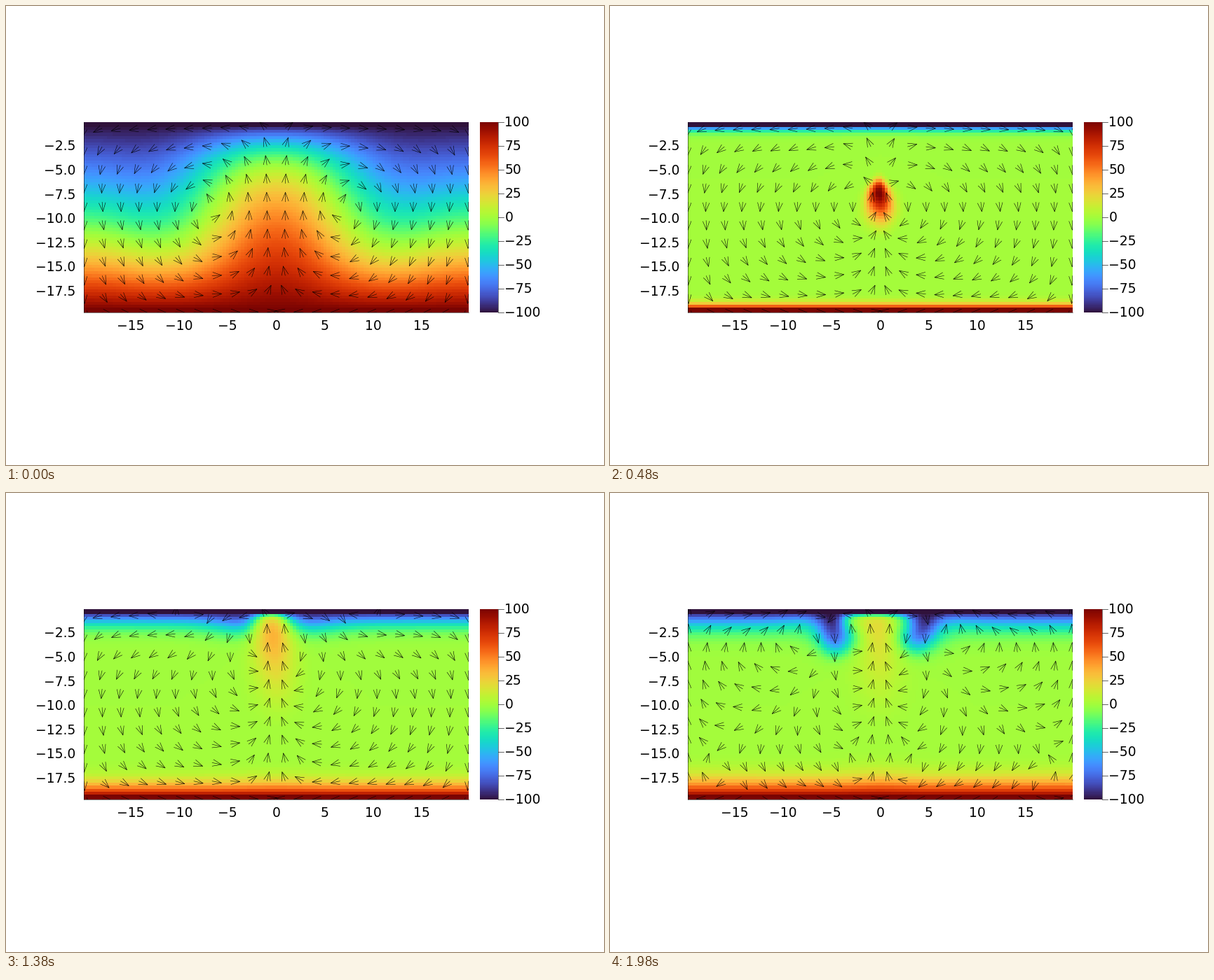
A matplotlib script for the animation above (2 s loop, 853 by 656 pixels).

```python
import numpy as np
import matplotlib.pyplot as plt
from matplotlib.animation import FuncAnimation
from matplotlib.collections import LineCollection

W, H, DPI = 853, 656, 128
PX = 72 / DPI                                  # points per pixel
LEFT, TOP, RIGHT, BOTTOM = 111, 166, 659.5, 438
FONT = 18.8

# Porous convection in a 40 x 20 box
LX, LY, DT, PHI = 40.0, 20.0, 200.0, 0.1
NY = 63
NX = 2 * (NY + 1) - 1
DX, DY = LX / NX, LY / NY
xc = -LX / 2 + DX * (np.arange(NX) + 0.5)
yc = -LY + DY * (np.arange(NY) + 0.5)
ST = 6


def cosines(n):
    """Orthonormal cosine basis and its Laplacian eigenvalues (unit spacing)."""
    m = np.arange(n)
    c = np.cos(np.pi * np.outer(m + 0.5, m) / n) * np.sqrt(2 / n)
    c[:, 0] /= np.sqrt(2)
    return c, 2 * np.cos(np.pi * m / n) - 2


CX, ex = cosines(NX)
CY, ey = cosines(NY)
LAP = ex[:, None] / DX**2 + ey / DY**2
LAP[0, 0] = 1.0


def fix_edges(T):
    T[0], T[-1] = T[1], T[-2]
    T[:, :2] = DT / 2
    T[:, -2:] = -DT / 2


def start():
    T = DT * np.exp(-xc[:, None]**2 - (yc + LY / 2)**2)
    fix_edges(T)
    return T


def darcy(T):
    """Divergence-free flux driven by buoyancy, closed on all sides."""
    qx, qy = np.zeros((NX + 1, NY)), np.zeros((NX, NY + 1))
    qy[:, 1:-1] = (T[:, 1:] + T[:, :-1]) / 2
    src = np.diff(qy, axis=1) / DY
    P = CX @ ((CX.T @ src @ CY) / LAP) @ CY.T
    qx[1:-1] = -np.diff(P, axis=0) / DX
    qy[:, 1:-1] -= np.diff(P, axis=1) / DY
    return qx, qy


def step(T, ra):
    """Advance T in place by one explicit step and return the flux used."""
    lam = DT * LY / PHI / ra
    qx, qy = darcy(T)
    dt = min(min(DX, DY)**2 / lam / 4.1,
             PHI / 2.1 * min(DX / np.abs(qx).max(), DY / np.abs(qy).max()))
    T[1:-1, 1:-1] += dt * lam * (np.diff(T[:, 1:-1], 2, axis=0) / DX**2
                                 + np.diff(T[1:-1], 2, axis=1) / DY**2)
    gx = np.diff(T[:, 1:-1], axis=0) / DX
    gy = np.diff(T[1:-1], axis=1) / DY
    # upwind advection, with the flux read one face back
    T[1:-1, 1:-1] -= dt / PHI * (
        np.maximum(qx[:-3, 1:-1], 0) * gx[:-1]
        + np.minimum(qx[1:-2, 1:-1], 0) * gx[1:]
        + np.maximum(qy[1:-1, :-3], 0) * gy[:, :-1]
        + np.minimum(qy[1:-1, 1:-2], 0) * gy[:, 1:])
    fix_edges(T)
    return qx, qy


def arrows(qx, qy):
    """Open unit arrows: one polyline for the barbs, one for the shaft."""
    u = ((qx[1:] + qx[:-1]) / 2)[::ST, ::ST].ravel()
    v = ((qy[:, 1:] + qy[:, :-1]) / 2)[::ST, ::ST].ravel()
    mag = np.hypot(u, v) + 1e-30
    d = np.stack([u, v], 1) / mag[:, None]
    n = np.stack([-d[:, 1], d[:, 0]], 1)
    gx, gy = np.meshgrid(xc[::ST], yc[::ST], indexing="ij")
    base = np.stack([gx.ravel(), gy.ravel()], 1)
    tip = base + d
    back, side = tip - 0.92 * d, 0.35 * n
    return (list(np.stack([back + side, tip, back - side], 1))
            + list(np.stack([base, tip], 1)))


def simulate():
    # slow convection, grown until its plume is well developed
    T = start()
    for i in range(4000):
        q = step(T, 100)
        if i > 400 and T[NX // 2, NY // 2] >= 48:
            break
    states = [(T.copy(), arrows(*q))]
    # vigorous convection from the fresh hot spot, kept every fifth step
    T = start()
    for i in range(96):
        q = step(T, 1000)
        if i % 5 == 0:
            states.append((T.copy(), arrows(*q)))
    return states


states = simulate()

fig = plt.figure(figsize=(W / DPI, H / DPI), dpi=DPI, facecolor="white")


def panel(x0, y0, x1, y1):
    ax = fig.add_axes([x0 / W, 1 - y1 / H, (x1 - x0) / W, (y1 - y0) / H])
    ax.set(xticks=[], yticks=[])
    for s in ax.spines.values():
        s.set_visible(False)
    return ax


def label(x, y, value, fmt, ha):
    text = format(value, fmt).replace("-", "\u2212")
    page.text(x, y + 0.3645 * FONT, text, ha=ha, va="baseline",
              family="DejaVu Sans", size=FONT * PX, color="black")


page = panel(0, 0, W, H)
page.set(xlim=(0, W), ylim=(H, 0))
page.patch.set_visible(False)

scale = (RIGHT - LEFT) / (xc[-1] - xc[0])
for x in range(-15, 16, 5):
    label(LEFT + (x - xc[0]) * scale, 456, x, "d", "center")
for y in np.arange(-17.5, 0, 2.5):
    label(99, TOP + (yc[-1] - y) * scale + 1.2, y, ".1f", "right")

for v in range(-100, 101, 25):
    y = (TOP + BOTTOM) / 2 - v * (BOTTOM - TOP) / 200
    page.plot([702, 710.5], [y, y], color="black", lw=0.6 * PX)
    label(711.5, y - 0.6, v, "d", "left")

bar = panel(676, TOP, 702, BOTTOM)
bar.imshow(np.linspace(0, 1, 256)[:, None], cmap="turbo", aspect="auto",
           origin="lower", interpolation="nearest")
page.plot([702, 702], [TOP, BOTTOM], color="black", lw=0.5 * PX)

ax = panel(LEFT, TOP, RIGHT, BOTTOM)
heat = ax.imshow(states[0][0].T, cmap="turbo", vmin=-100, vmax=100,
                 origin="lower", aspect="auto", interpolation="nearest",
                 extent=(-LX / 2, LX / 2, -LY, 0))
flow = LineCollection(states[0][1], colors="black", linewidths=0.55 * PX)
ax.add_collection(flow)
ax.set(xlim=(xc[0], xc[-1]), ylim=(yc[0], yc[-1]))
for side in ("left", "bottom"):
    ax.spines[side].set(visible=True, linewidth=0.5 * PX)


def draw(i):
    t = 20 * i
    T, segs = states[0 if t < 80 else 1 + (t - 80) // 100]
    heat.set_data(T.T)
    flow.set_segments(segs)
    return heat, flow


anim = FuncAnimation(fig, draw, frames=100, interval=20, repeat=True)
plt.show()
```
